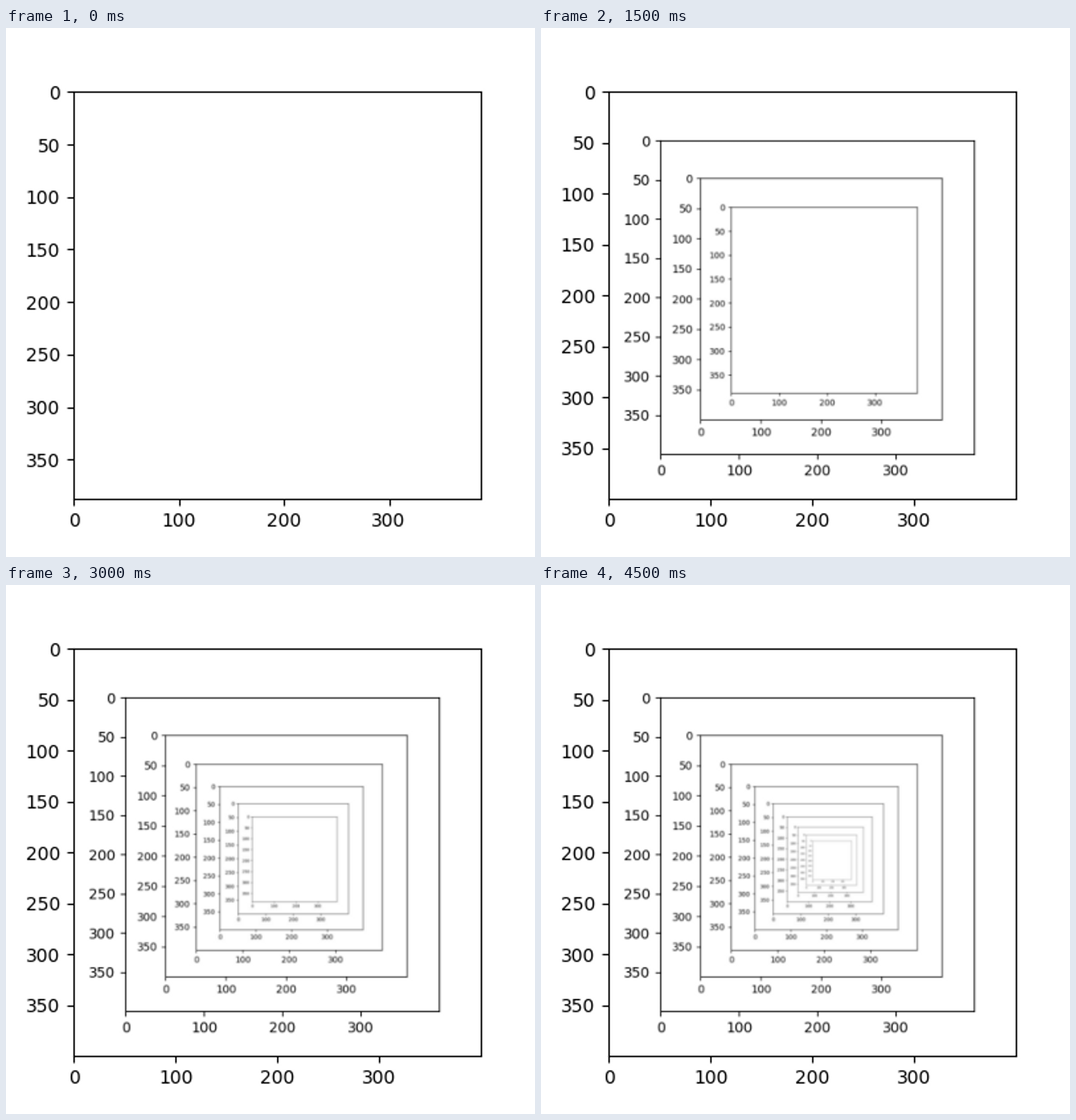
Animation, 748 px wide and 748 px high, one loop 5000 ms. Source, as a matplotlib script:

```python
import matplotlib.pyplot as plt
import numpy as np
from matplotlib.animation import FuncAnimation

STAGE = 748          # stage side in pixels
PAGE = 400           # side of one nested plot page
DPI = 100
LEFT, BOTTOM, SIDE = 51, 44, 308   # axes box on a page
LEVELS = 10

fig = plt.figure(figsize=(STAGE / DPI, STAGE / DPI), dpi=DPI, facecolor="white")


def plot_page(picture):
    """Show a picture in ticked axes and return the drawn page as RGB."""
    fig.clear()
    ax = fig.add_axes([v / STAGE for v in (LEFT, BOTTOM, SIDE, SIDE)])
    ax.imshow(picture)
    fig.canvas.draw()
    canvas = np.asarray(fig.canvas.buffer_rgba())
    return canvas[-PAGE:, :PAGE, :3].copy()


# Each page is a plot of the page before it, starting from a blank sheet.
pages = []
picture = np.full((388, 388, 3), 255, dtype=np.uint8)
for _ in range(LEVELS):
    picture = plot_page(picture)
    pages.append(picture)

fig.clear()
stage = fig.add_axes([0, 0, 1, 1])
stage.axis("off")
view = stage.imshow(pages[0], aspect="auto", interpolation="catrom")


def update(i):
    view.set_data(pages[i])
    return [view]


anim = FuncAnimation(fig, update, frames=LEVELS, interval=500, repeat=True,
                     repeat_delay=0, blit=False)
plt.show()
```
